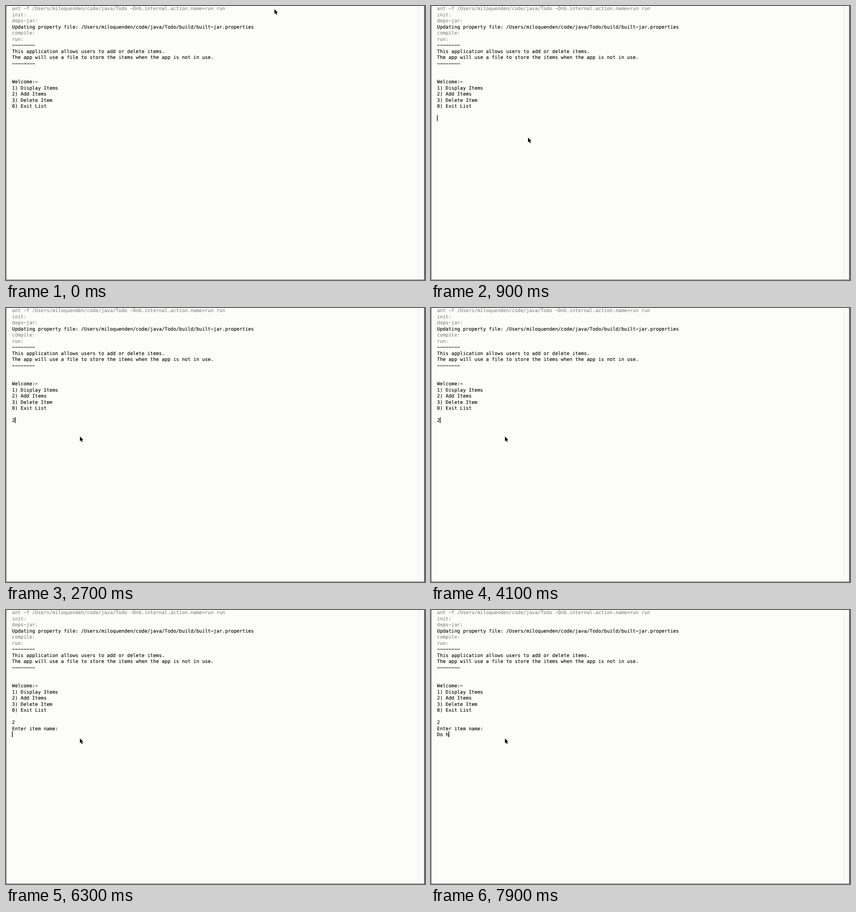
An HTML page that plays this animation: 924 px wide and 606 px high, repeating every 8 s.

```html
<!DOCTYPE html>
<html lang="en">
<head>
<meta charset="utf-8">
<title>Console session</title>
<style>
  html, body { margin: 0; width: 100%; height: 100%; overflow: hidden; background: #fcfcfb; }
  svg { display: block; width: 924px; height: 606px; }
  text {
    font: 10.55px "DejaVu Sans Mono", "Liberation Mono", monospace;
    text-rendering: geometricPrecision;
    white-space: pre;
    fill: #000;
    stroke: #000;
    stroke-width: .12;
  }
  .dim { fill: #707070; stroke: none; }
</style>
</head>
<body>
<svg viewBox="0 0 924 606">
  <rect width="924" height="606" fill="#fcfcfb"/>
  <rect x="910" width="12" height="605" fill="#fafafa"/>
  <rect x="909.5" width="1" height="605" fill="#ededed"/>
  <rect width="1.3" height="606" fill="#858585"/>
  <rect x="922" width="2" height="606" fill="#5c5c5c"/>
  <rect y="605" width="924" height="1" fill="#6a6a6a"/>
  <g id="lines"></g>
  <rect id="caret" width="1.4" height="13"/>
  <g id="pointer">
    <path d="M.4 1.2V12L3 9.8 4.7 13.4 6.5 12.6 5 9H8Z" fill="#000" opacity=".14"/>
    <path d="M0 0V10.6L2.4 8.4 4.1 12.3 6 11.5 4.3 7.7H7.5Z"
          stroke="#fff" stroke-width="1.4" paint-order="stroke" stroke-linejoin="round"/>
  </g>
</svg>
<script>
const LOOP = 8000, LEFT = 13.3, PITCH = 13.5, ADVANCE = 6.351;
const INPUT_ROW = 18, PROMPT_ROW = 19, NAME_ROW = 20;
const $ = id => document.getElementById(id);

const dim = new Set([0, 1, 2, 4, 5]);
const output = [
  "ant -f /Users/miloquenden/code/java/Todo -Dnb.internal.action.name=run run",
  "init:",
  "deps-jar:",
  "Updating property file: /Users/miloquenden/code/java/Todo/build/built-jar.properties",
  "compile:",
  "run:",
  "--------",
  "This application allows users to add or delete items.",
  "The app will use a file to store the items when the app is not in use.",
  "--------",
  "",
  "",
  "Welcome:-",
  "1) Display Items",
  "2) Add Items",
  "3) Delete Item",
  "0) Exit List"
];

// [time, pointer x, pointer y]
const moves = [
  [0, 592, 7], [100, 520, 54], [200, 363, 160], [400, 222, 291],
  [900, 214, 291], [1000, 196, 289], [1100, 178, 286], [1200, 168, 285], [1300, 163, 284]
];

// [time, choice, item name (null before the prompt), caret shown]
const typing = [
  [0, "", null, 0], [700, "", null, 1], [1200, "", null, 0],
  [1700, "", null, 1], [2200, "", null, 0], [2700, "2", null, 1],
  [3200, "", null, 1], [3700, "", null, 0], [4100, "2", null, 1],
  [4300, "2", "", 1], [4800, "2", "", 0], [5300, "2", "", 1],
  [5800, "2", "", 0], [6300, "2", "", 1], [6800, "2", "", 0],
  [7300, "2", "", 1], [7400, "2", "D", 1], [7500, "2", "Do", 1],
  [7600, "2", "Do ", 1], [7900, "2", "Do h", 1]
];

// The console face has wide hyphens, so the minus glyph is used for them.
const wide = s => s.replace(/-/g, "\u2212");

function addLine(row, content = "") {
  const el = document.createElementNS("http://www.w3.org/2000/svg", "text");
  el.setAttribute("x", LEFT);
  el.setAttribute("y", 9 + row * PITCH);
  if (dim.has(row)) el.setAttribute("class", "dim");
  el.textContent = wide(content);
  $("lines").append(el);
  return el;
}

output.forEach((s, row) => addLine(row, s));
const choiceLine = addLine(INPUT_ROW);
const promptLine = addLine(PROMPT_ROW);
const nameLine = addLine(NAME_ROW);

const stepAt = (steps, t) => steps.findLast(s => s[0] <= t) || steps[0];

function draw(t) {
  const [, x, y] = stepAt(moves, t);
  const [, choice, name, shown] = stepAt(typing, t);
  const asked = name !== null;

  choiceLine.textContent = choice;
  promptLine.textContent = asked ? "Enter item name:" : "";
  nameLine.textContent = name || "";

  const row = asked ? NAME_ROW : INPUT_ROW;
  const typed = asked ? name : choice;
  $("caret").setAttribute("x", LEFT + typed.length * ADVANCE);
  $("caret").setAttribute("y", row * PITCH - 1.5);
  $("caret").setAttribute("visibility", shown ? "visible" : "hidden");
  $("pointer").setAttribute("transform", `translate(${x} ${y})`);
}

const start = performance.now();
function tick() {
  draw((performance.now() - start) % LOOP);
  requestAnimationFrame(tick);
}
tick();
</script>
</body>
</html>
```
